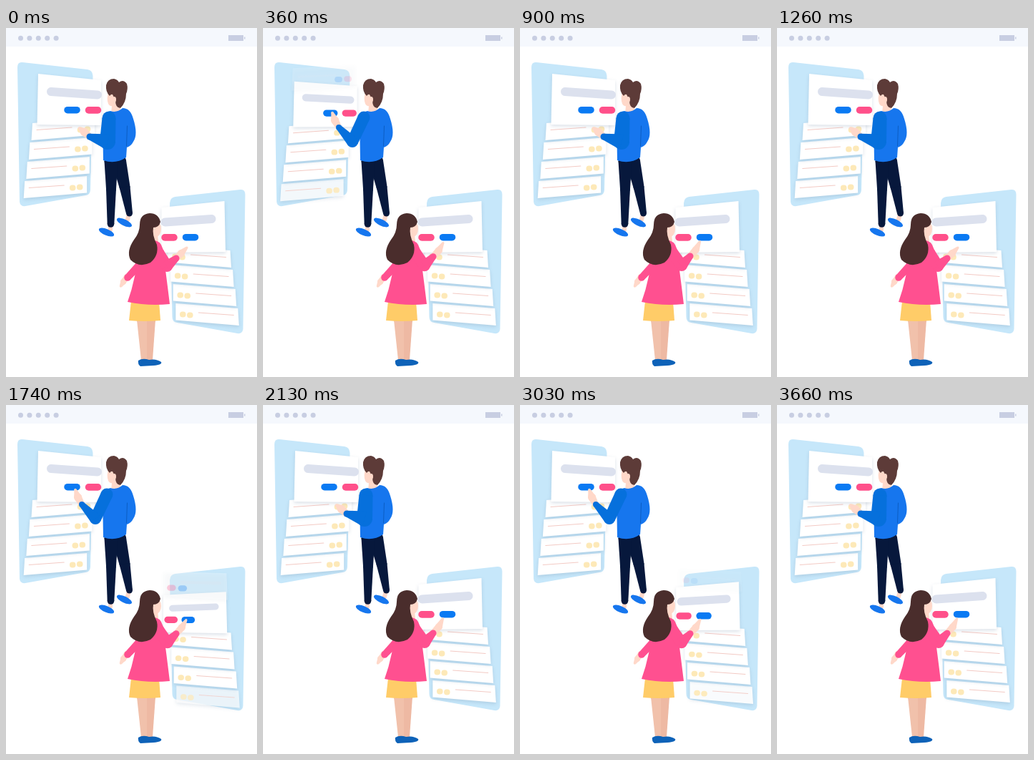
Animation of 351 by 488 pixels, one loop 3.69 s. Source, as an HTML page with a canvas:

```html
<!DOCTYPE html>
<html lang="en">
<head>
<meta charset="utf-8">
<title>Card lists</title>
<style>
  html, body { margin: 0; width: 100%; height: 100%; overflow: hidden; background: #fff; }
  canvas { display: block; width: 351px; height: 488px; }
</style>
</head>
<body>
<canvas id="stage"></canvas>
<script>
const W = 351, H = 488, CYCLE = 1230;
const canvas = document.getElementById('stage');
const ratio = window.devicePixelRatio || 1;
canvas.width = W * ratio;
canvas.height = H * ratio;
const ctx = canvas.getContext('2d');

const BLUE = [10, 122, 243], PINK = [255, 80, 138], YELLOW = [253, 233, 184];
const GREY = [220, 225, 238], LINE = [243, 202, 196];
const SKIN = '#ffd8c9', SHIRT = '#1676ee', SLEEVE = '#0670dc', DRESS = '#ff5090';

const clamp = x => Math.max(0, Math.min(1, x));
const lerp = (a, b, p) => a + (b - a) * p;
const smooth = (t, from, to) => { const u = clamp((t - from) / (to - from)); return u * u * (3 - 2 * u); };
const easeOut = (t, from, span) => 1 - (1 - clamp((t - from) / span)) ** 3;
const rgb = c => `rgb(${c.map(Math.round).join()})`;

// Blends two values of the same form: numbers, arrays or records.
function blend(a, b, p) {
  if (typeof a === 'number') return lerp(a, b, p);
  if (Array.isArray(a)) return a.map((v, i) => blend(v, b[i], p));
  return Object.fromEntries(Object.keys(a).map(k => [k, blend(a[k], b[k], p)]));
}

function fill(d, color) {
  ctx.fillStyle = color;
  ctx.fill(new Path2D(d));
}

function stroke(x1, y1, x2, y2, width, color) {
  ctx.lineWidth = width;
  ctx.lineCap = 'round';
  ctx.strokeStyle = color;
  ctx.beginPath();
  ctx.moveTo(x1, y1);
  ctx.lineTo(x2, y2);
  ctx.stroke();
}

function oval(x, y, rx, ry, color, turn = 0) {
  ctx.fillStyle = color;
  ctx.beginPath();
  ctx.ellipse(x, y, rx, ry, turn, 0, 7);
  ctx.fill();
}

// A tapered chain through joints given as [x, y, radius].
function limb(color, ...joints) {
  joints.forEach(([x, y, r]) => oval(x, y, r, r, color));
  for (let i = 1; i < joints.length; i++) {
    const [x1, y1, r1] = joints[i - 1], [x2, y2, r2] = joints[i];
    const a = Math.atan2(y2 - y1, x2 - x1), nx = -Math.sin(a), ny = Math.cos(a);
    ctx.beginPath();
    ctx.moveTo(x1 + nx * r1, y1 + ny * r1);
    ctx.lineTo(x2 + nx * r2, y2 + ny * r2);
    ctx.lineTo(x2 - nx * r2, y2 - ny * r2);
    ctx.lineTo(x1 - nx * r1, y1 - ny * r1);
    ctx.fill();
  }
}

// Card layouts: "rise" is the drop of an edge from its left to its right end.
const row = k => ({
  x: 40.6 - 3.6 * k, y: 106 + 27 * k, w: 87, rise: -7, left: 24, right: 23.5,
  line: { x: 6, y: 9.5, w: 49, rise: -3.5, thick: 1.1 },
  dots: { x: 67, y: 9.5, gap: 10, rise: -1, w: 8.6, h: 7.8 }
});
const bigCard = {
  x: 45, y: 64, w: 88, rise: 9, left: 71, right: 63,
  line: { x: 18, y: 25, w: 65, rise: 4.5, thick: 12 },
  dots: { x: 47.5, y: 50.7, gap: 29.5, rise: 0.2, w: 22.5, h: 9.6 }
};
const above = { ...row(-1.9), x: 41 };
const slot = k => k < 0 ? above : k === 0 ? bigCard : row(k);

function drawCard({ x, y, w, rise, left, right, line, dots }, big, alpha) {
  if (alpha <= 0) return;
  const tint = clamp(big * 1.4);
  ctx.save();
  ctx.globalAlpha = alpha;
  ctx.translate(x, y);
  ctx.shadowColor = 'rgba(90,120,150,.22)';
  ctx.shadowBlur = 5 * ratio;
  ctx.shadowOffsetY = 2 * ratio;
  fill(`M0 0L${w} ${rise}V${rise + right}L-1.500 ${left}Z`, '#fff');
  ctx.shadowColor = 'transparent';
  stroke(line.x, line.y, line.x + line.w, line.y + line.rise, line.thick, rgb(blend(LINE, GREY, tint)));
  [BLUE, PINK].forEach((color, i) => {
    const cx = dots.x + i * dots.gap, cy = dots.y + i * dots.rise, reach = (dots.w - dots.h) / 2;
    stroke(cx - reach, cy, cx + reach, cy, dots.h, rgb(blend(YELLOW, color, tint)));
  });
  ctx.restore();
}

// Every card moves up one slot; the top one fades away and a new one fades in below.
function drawList(p) {
  fill('M23 48L114 58Q121 59 121.500 67L118 226Q118 233 111 234L27 249Q20 250 19 243L16 55Q16 47 23 48Z', '#c6e7fa');
  for (let k = 5; k >= 0; k--) {
    const big = k === 0 ? 1 : k === 1 ? p : 0;
    const alpha = k === 0 ? 1 - p : k === 5 ? p : 1;
    drawCard(blend(slot(k), slot(k - 1), p), big, alpha);
  }
}

function drawHeader() {
  fill('M0 0H351V26H0Z', '#f5f8fd');
  for (let i = 0; i < 5; i++) oval(20.5 + 12.4 * i, 14.2, 3.5, 3.5, '#c8cee2');
  fill('M311 10H332V18H311ZM333 12.500H334.500V15.500H333Z', '#c8cee2');
}

// Arm poses, lowered and raised: shoulder, elbow, wrist, palm, fingertip.
const manArm = [
  [[144, 126, 9.5], [142, 159, 11], [117, 152, 4.5], [109, 145, 5.5], [102.5, 140, 1.8]],
  [[141, 125, 8.5], [125, 159, 8], [106, 139, 4], [100.5, 129, 5.5], [97, 118.5, 1.8]]
];
const girlArm = [
  [[213, 314, 8], [225, 333, 8], [238, 322, 4.5], [245, 315, 5], [253, 307, 1.6]],
  [[213, 314, 8], [226, 332, 8], [238, 319, 4.5], [246, 310, 5], [251.5, 298.5, 1.6]]
];

function drawArm(poses, raise, color) {
  const [shoulder, elbow, wrist, palm, tip] = blend(...poses, raise);
  limb(SKIN, wrist, palm, tip);
  limb(color, shoulder, elbow, wrist);
}

function drawMan(raise) {
  limb(SKIN, [146, 274, 3], [146, 282, 3]);
  limb(SKIN, [172, 260, 3], [170, 268, 3]);
  oval(140.5, 285.5, 11.5, 4.4, SHIRT, 0.4);
  oval(165.5, 272, 11.5, 4.4, SHIRT, 0.45);
  limb('#07183c', [158, 186, 10], [166, 222, 7.5], [172.5, 259, 4.5]);
  limb('#07183c', [147, 186, 9.5], [147, 225, 7], [146.5, 274, 4.8]);

  fill('M144 86Q140 99 143 106Q145 110 148 109L147 119Q153 123 160 114L159 91Z', SKIN);
  fill('M145 95Q139 89 140 80Q142 71 151 71Q156 72 158 76Q164 71 169 78Q171 85 168 92Q168 104 160 112Q153 112 153 101L149 93Q147 92 145 95Z', '#5d3b38');
  oval(151.5, 100, 2.5, 4, SKIN);

  fill('M146 116Q155 119 163 112Q174 112 178 127Q185 149 178 159Q175 165 169 167L168 181Q153 191 136 185L135 124Q138 118 146 116Z', SHIRT);
  stroke(169.5, 137, 168.5, 165, 0.8, '#0a57b8');
  drawArm(manArm, raise, SLEEVE);
}

function drawGirl(raise) {
  limb('#eeb9a3', [202, 408, 7], [201, 464, 4]);
  limb('#f1c1ab', [190, 408, 7], [193, 464, 4]);
  fill('M185 465Q191 461 200 464Q210 462 217 467Q219 471 206 472L188 473Q184 470 185 465Z', '#0e62b8');
  fill('M175 382L172 409Q194 411 216 409L214 382Z', '#ffcc68');

  limb(SKIN, [169, 348, 4], [164, 355, 4], [160.5, 361, 1.8]);
  limb(DRESS, [186, 332, 5.5], [170, 349, 4.8]);
  oval(210, 281, 7, 11, SKIN);
  limb(SKIN, [208, 288, 4], [209, 298, 4]);
  fill('M186 306Q182 350 170 383Q199 389 229 386Q224 345 219 308Q216 297 206 297Z', DRESS);
  drawArm(girlArm, raise, DRESS);
  fill('M201 259Q187 260 187 275Q187 286 179 296Q168 312 174 324Q186 336 202 328Q214 318 211 303Q204 289 206 279Q214 279 216 271Q213 259 201 259Z', '#4a2d2c');
}

function draw(t) {
  ctx.setTransform(ratio, 0, 0, ratio, 0, 0);
  ctx.fillStyle = '#fff';
  ctx.fillRect(0, 0, W, H);
  drawHeader();
  drawList(easeOut(t, 240, 260));
  ctx.save();
  ctx.translate(350.5, 178);
  ctx.scale(-1, 1);
  drawList(easeOut(t, 420, 260));
  ctx.restore();
  drawMan(smooth(t, 125, 255) - smooth(t, 640, 840));
  const press = 0.25 * (smooth(t, 400, 490) - smooth(t, 540, 680));
  drawGirl(smooth(t, 230, 420) - press - smooth(t, 1195, CYCLE));
}

let origin;
function tick(now) {
  origin ??= now;
  draw((now - origin) % CYCLE);
  requestAnimationFrame(tick);
}
requestAnimationFrame(tick);
</script>
</body>
</html>
```
